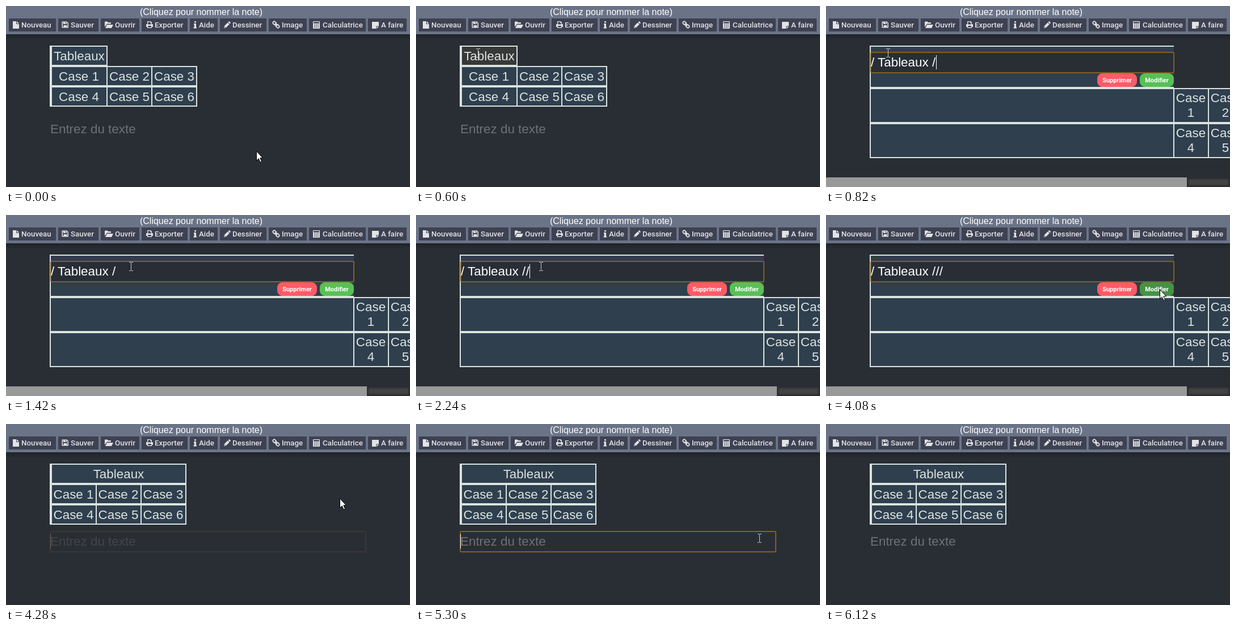
Write an HTML page that moves like this. It is 712x320 px and loops after 6320 ms.

```html
<!DOCTYPE html>
<html lang="fr">
<head>
<meta charset="utf-8">
<title>Tableaux</title>
<style>
  html, body { margin: 0; width: 100%; height: 100%; overflow: hidden; background: #292e35; }
  svg { display: block; width: 100%; height: 100%; }
  text { font-family: "Liberation Sans", Arial, sans-serif; font-size: 22.4px; white-space: pre; }

  .title { font-size: 16px; fill: #fff; text-anchor: middle; }
  .bar rect { fill: #3d4152; }
  .bar text { font: 500 13.3px Roboto, sans-serif; fill: #e2e3e5; }
  .icon { fill: #e2e3e5; stroke: none; }
  .cut { fill: #3d4152; }
  .line { fill: none; stroke: #e2e3e5; stroke-width: 1.8; }

  .grid { fill: #dbe3df; }
  .cell { fill: #2f3f4e; }
  .table text { fill: #dde4e1; text-anchor: middle; }
  .hint { fill: #6f7173; }
  .value { fill: #fff; }
  .field { fill: #292e35; stroke: #83601f; stroke-width: 2; }
  .pill { font: 700 11px Roboto, sans-serif; fill: #fff; text-anchor: middle; }

  .anim { animation: 6320ms step-end infinite; }
  #start { animation-name: start; }
  #hover { animation-name: hover; }
  #edit { animation-name: edit; }
  #slash2 { animation-name: slash2; }
  #slash3 { animation-name: slash3; }
  #pressed { animation-name: pressed; }
  #done { animation-name: done; }
  #fading { animation-name: fading; }
  #focused { animation-name: focused; }
  #blurred { animation-name: blurred; }
  #caret { animation-name: caret; }
  #arrow { animation-name: arrow; }
  #beam { animation-name: beam; }

  @keyframes start { 0% { opacity: 1 } 12.97%, 100% { opacity: 0 } }
  @keyframes hover { 0% { opacity: 0 } 6.32% { opacity: 1 } 12.97%, 100% { opacity: 0 } }
  @keyframes edit { 0% { opacity: 0 } 12.97% { opacity: 1 } 67.72%, 100% { opacity: 0 } }
  @keyframes slash2 { 0% { opacity: 0 } 35.44%, 100% { opacity: 1 } }
  @keyframes slash3 { 0% { opacity: 0 } 41.77%, 100% { opacity: 1 } }
  @keyframes pressed { 0% { opacity: 0 } 61.39%, 100% { opacity: 1 } }
  @keyframes done { 0% { opacity: 0 } 67.72%, 100% { opacity: 1 } }
  @keyframes fading { 0% { opacity: 1 } 70.88%, 100% { opacity: 0 } }
  @keyframes focused { 0% { opacity: 0 } 70.88% { opacity: 1 } 96.83%, 100% { opacity: 0 } }
  @keyframes blurred { 0% { opacity: 0 } 96.83%, 100% { opacity: 1 } }

  /* Off-stage means hidden. */
  @keyframes caret {
    0% { transform: translate(-50px, 0) }
    12.97% { transform: translate(194px, 87px) }
    22.46% { transform: translate(-50px, 0) }
    29.11% { transform: translate(194px, 87px) }
    35.44% { transform: translate(200px, 87px) }
    41.77% { transform: translate(206px, 87px) }
    48.41% { transform: translate(-50px, 0) }
    57.91% { transform: translate(206px, 87px) }
    64.55% { transform: translate(-50px, 0) }
    70.88% { transform: translate(78px, 195px) }
    77.21% { transform: translate(-50px, 0) }
    83.86% { transform: translate(78px, 195px) }
    90.18%, 100% { transform: translate(-50px, 0) }
  }
  @keyframes arrow {
    0% { transform: translate(441px, 256px) }
    3.16% { transform: translate(119px, 103px) }
    6.32% { transform: translate(-50px, 0) }
    51.58% { transform: translate(249px, 66px) }
    54.74% { transform: translate(-50px, 0) }
    61.39% { transform: translate(588px, 131px) }
    74.05% { transform: translate(583px, 134px) }
    77.21% { transform: translate(582px, 134px) }
    83.86% { transform: translate(-50px, 0) }
    87.02% { transform: translate(643px, 293px) }
    90.18%, 100% { transform: translate(-50px, 0) }
  }
  @keyframes beam {
    0% { transform: translate(-50px, 0) }
    6.32% { transform: translate(105px, 75px) }
    9.49% { transform: translate(106px, 75px) }
    16.13% { transform: translate(158px, 78px) }
    19.3% { transform: translate(217px, 83px) }
    51.58% { transform: translate(-50px, 0) }
    54.74% { transform: translate(511px, 91px) }
    57.91% { transform: translate(584px, 109px) }
    61.39% { transform: translate(-50px, 0) }
    83.86% { transform: translate(602px, 194px) }
    87.02%, 100% { transform: translate(-50px, 0) }
  }
</style>
</head>
<body>
<svg viewBox="0 0 712 320" xmlns="http://www.w3.org/2000/svg">
  <defs>
    <linearGradient id="shade" x2="0" y2="1">
      <stop offset="0" stop-color="#000" stop-opacity=".25"/>
      <stop offset="1" stop-color="#000" stop-opacity="0"/>
    </linearGradient>
    <filter id="soft"><feGaussianBlur stdDeviation="1.5"/></filter>
  </defs>

  <rect width="712" height="320" fill="#292e35"/>
  <rect y="50" width="712" height="10" fill="url(#shade)"/>
  <rect width="712" height="50" fill="#6b7487"/>
  <text class="title" x="344" y="16">(Cliquez pour nommer la note)</text>

  <g class="bar">
    <rect x="5" y="22" width="83" height="23"/>
    <rect x="92" y="22" width="71" height="23"/>
    <rect x="167" y="22" width="68" height="23"/>
    <rect x="239" y="22" width="81" height="23"/>
    <rect x="324" y="22" width="49" height="23"/>
    <rect x="377" y="22" width="82" height="23"/>
    <rect x="463" y="22" width="67" height="23"/>
    <rect x="534" y="22" width="100" height="23"/>
    <rect x="638" y="22" width="68" height="23"/>
    <text x="27" y="38">Nouveau</text>
    <text x="114" y="38">Sauver</text>
    <text x="192" y="38">Ouvrir</text>
    <text x="262" y="38">Exporter</text>
    <text x="340" y="38">Aide</text>
    <text x="399" y="38">Dessiner</text>
    <text x="486" y="38">Image</text>
    <text x="558" y="38">Calculatrice</text>
    <text x="661" y="38">A faire</text>
  </g>

  <g class="icon">
    <path d="M12 27h6v5h5v8H12zM19 27l4 4h-4z"/>
    <g transform="translate(98 27)">
      <path d="M1 .5h8.500l2.500 2.500v8.500h-11.500v-11z"/>
      <path class="cut" d="M2 2h1v3h6v-3l1.500 1.500v6.500h-1v-3h-6v3h-1.500zM6 2h1.500v2H6z"/>
    </g>
    <path d="M174 37v-8.500q0-1 1-1h3.500l1.500 1.500h4q1 0 1 1v1.500h-7zM175 39l3-6h11l-3 6z"/>
    <g transform="translate(247 27)">
      <path d="M2 0h6l2 2v3.500h-8zM0 6q0-1 1-1h10q1 0 1 1v4h-2v2h-8v-2h-2z"/>
      <path class="cut" d="M3.300 1.200h4v2h1.500v2.300h-5.500zM3.300 8h5.500v2.800h-5.500z"/>
    </g>
    <path d="M332 27h3v2.500h-3zM331 31h4v6.500h1v2h-5.500v-2h1.200v-4.500h-.7z"/>
    <g transform="translate(384 27)">
      <path d="M0 12l.8-3.800 6-6 3 3-6 6zM7.500 1.500l1-1q.8-.8 1.600 0l1.400 1.400q.8.800 0 1.600l-1 1z"/>
      <path class="cut" d="M1.400 9l1.600 1.600-1.200.3-.7-.7z"/>
    </g>
    <g class="line" transform="translate(476 33) rotate(45)">
      <rect x="-7" y="-2.300" width="6.500" height="4.600" rx="2"/>
      <rect x=".5" y="-2.300" width="6.500" height="4.600" rx="2"/>
      <path d="M-3 0h6"/>
    </g>
    <g transform="translate(541 27)">
      <rect width="12" height="13" rx="1"/>
      <path class="cut" d="M1.200 1.200h9.600v2.600h-9.600z"/>
      <path d="M2.200 6h9M2.200 8.500h9M2.200 11h9" fill="none" stroke="#3d4152" stroke-width="1.300" stroke-dasharray="1.500 1.500"/>
    </g>
    <path d="M645 28h12v7.500h-4.500v4.500h-7.500zM653.500 36.500h3.500l-3.500 3.500z"/>
  </g>

  <g id="start" class="anim">
    <path class="grid" d="M77 70h102v36h158v72H77z"/>
    <path class="cell" d="M81 72h96v32h-96zM81 108h96v32h-96zM179 108h77v32h-77zM258 108h77v32h-77zM81 144h96v32h-96zM179 144h77v32h-77zM258 144h77v32h-77z"/>
    <rect id="hover" class="anim" x="81" y="72" width="96" height="32" fill="#373837"/>
    <g class="table">
      <text x="129" y="95.500">Tableaux</text>
      <text x="128.500" y="131.500">Case 1</text>
      <text x="217.500" y="131.500">Case 2</text>
      <text x="296.500" y="131.500">Case 3</text>
      <text x="128.500" y="167.500">Case 4</text>
      <text x="217.500" y="167.500">Case 5</text>
      <text x="296.500" y="167.500">Case 6</text>
    </g>
    <text class="hint" x="78" y="225">Entrez du texte</text>
  </g>

  <g id="edit" class="anim">
    <path class="grid" d="M77 70h536v75h99v124H77z"/>
    <path class="cell" d="M79 72h534v71h-534zM79 147h533v58h-533zM614 147h59v58h-59zM675 147h37v58h-37zM79 209h533v58h-533zM614 209h59v58h-59zM675 209h37v58h-37z"/>
    <g class="table">
      <text x="643" y="170">Case</text><text x="643" y="196">1</text>
      <text x="704" y="170">Case</text><text x="704" y="196">2</text>
      <text x="643" y="232">Case</text><text x="643" y="258">4</text>
      <text x="704" y="232">Case</text><text x="704" y="258">5</text>
    </g>
    <rect class="field" x="79" y="82" width="534" height="36" rx="2"/>
    <g class="value">
      <text x="79" y="107">/ Tableaux /</text>
      <text id="slash2" class="anim" x="193.500" y="107">/</text>
      <text id="slash3" class="anim" x="199.700" y="107">/</text>
    </g>
    <rect x="478" y="119" width="70" height="24" rx="9" fill="#ff5b67"/>
    <rect x="553" y="119" width="60" height="24" rx="9" fill="#58c056"/>
    <rect id="pressed" class="anim" x="553" y="119" width="60" height="24" rx="9" fill="#449345"/>
    <text class="pill" x="513" y="135">Supprimer</text>
    <text class="pill" x="583" y="135">Modifier</text>
    <rect y="303" width="712" height="17" fill="#2b2c2e"/>
    <rect x="639" y="306" width="70" height="11" fill="#434343" filter="url(#soft)"/>
    <rect y="303" width="636" height="17" fill="#999"/>
  </g>

  <g id="done" class="anim">
    <path class="grid" d="M77 70h241v108H77z"/>
    <path class="cell" d="M81 72h235v32h-235zM81 108h77v32h-77zM160 108h77v32h-77zM239 108h77v32h-77zM81 144h77v32h-77zM160 144h77v32h-77zM239 144h77v32h-77z"/>
    <g class="table">
      <text x="198.500" y="95.500">Tableaux</text>
      <text x="119" y="131.500">Case 1</text>
      <text x="198" y="131.500">Case 2</text>
      <text x="277" y="131.500">Case 3</text>
      <text x="119" y="167.500">Case 4</text>
      <text x="198" y="167.500">Case 5</text>
      <text x="277" y="167.500">Case 6</text>
    </g>
    <g id="fading" class="anim">
      <rect x="78" y="190" width="556" height="36" rx="2" fill="none" stroke="#3c372f" stroke-width="2"/>
      <text x="78" y="215" fill="#41454b">Entrez du texte</text>
      <rect x="78" y="195" width="1" height="25" fill="#73665c"/>
    </g>
    <g id="focused" class="anim">
      <rect class="field" x="78" y="190" width="556" height="36" rx="2"/>
      <text class="hint" x="78" y="215">Entrez du texte</text>
    </g>
    <text id="blurred" class="anim hint" x="78" y="215">Entrez du texte</text>
  </g>

  <rect id="caret" class="anim" width="1" height="25" fill="#fff"/>
  <path id="beam" class="anim" d="M0 0h3v1h1v-1h3v1h-3v14h3v1h-3v-1h-1v1h-3v-1h3v-14h-3z" fill="#c9cdd0"/>
  <path id="arrow" class="anim" d="M.5 .8V17.300L4.300 13.700L7 20.200L9.600 19.100L6.900 12.700H11.500z" fill="#fff" stroke="#000"/>
</svg>
</body>
</html>
```
